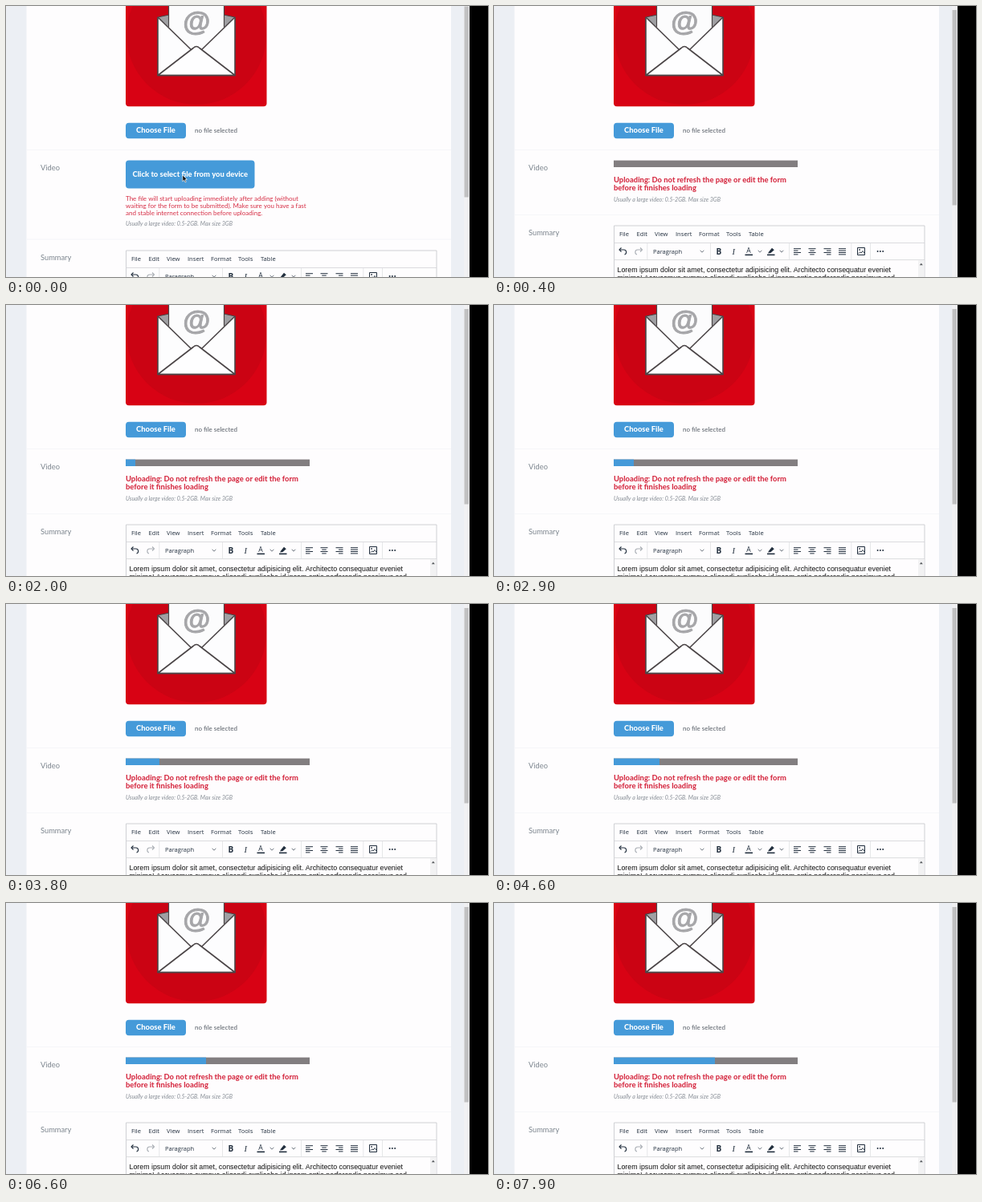
Recreate the animation shown at these times as an HTML page with a canvas. Size 600 px wide and 338 px high, loop 8000 ms.

```html
<!DOCTYPE html>
<html lang="en">
<head>
<meta charset="utf-8">
<title>Video upload form</title>
<style>
html, body { margin: 0; width: 100%; height: 100%; overflow: hidden; background: #000; }
canvas { display: block; width: 600px; height: 338px; }
</style>
</head>
<body>
<canvas id="stage"></canvas>
<script>
const W = 600, H = 338, LOOP = 8000, STEP = 100;
const UPLOAD_AT = 200;
const BLUE = '#459ad9', RED = '#d62e45', INK = '#222f3e', MUTED = '#7c858e';
const UI = 'Lato, sans-serif', MENU = '"Open Sans", sans-serif', BODY = '"Liberation Sans", Arial, sans-serif';
const STRONG = '800 9.4px ' + UI;
// Upload progress: [time in ms, filled pixels]
const PROGRESS = [[1000, 0], [2000, 12], [2900, 25], [4600, 57], [6600, 100], [7900, 126], [8000, 128]];

const canvas = document.getElementById('stage');
const c = canvas.getContext('2d');
const dpr = window.devicePixelRatio || 1;
canvas.width = W * dpr;
canvas.height = H * dpr;

function rect(x, y, w, h, fill) {
  c.fillStyle = fill;
  c.fillRect(x, y, w, h);
}

function round(x, y, w, h, r, fill) {
  c.fillStyle = fill;
  c.beginPath();
  c.roundRect(x, y, w, h, r);
  c.fill();
}

function text(s, x, y, font, fill) {
  c.font = font;
  c.fillStyle = fill;
  c.fillText(s, x, y);
}

function path(points, fill, stroke, width = 1) {
  c.beginPath();
  points.forEach(([x, y], i) => i ? c.lineTo(x, y) : c.moveTo(x, y));
  if (fill) {
    c.closePath();
    c.fillStyle = fill;
    c.fill();
  }
  if (stroke) {
    c.strokeStyle = stroke;
    c.lineWidth = width;
    c.stroke();
  }
}

function progress(t) {
  if (t <= PROGRESS[0][0]) return 0;
  const i = PROGRESS.findIndex(p => p[0] >= t);
  const [t0, w0] = PROGRESS[i - 1], [t1, w1] = PROGRESS[i];
  return w0 + (w1 - w0) * (t - t0) / (t1 - t0);
}

function page(uploading) {
  rect(0, 0, W, H, '#eceff4');
  rect(25.5, 0, 528.5, H, '#fefdfe');
  rect(570, 0, 7, H, '#f1f1f3');
  if (uploading) rect(570.5, 5, 5.5, 243.5, '#c1c1c2');
  else rect(570.5, 0.5, 5.5, 238, '#c1c1c2');
  rect(577, 0, 23, H, '#000');
  rect(26, 179, 528, 1, '#f6f6f9');
  rect(26, uploading ? 260 : 290.5, 528, 1, '#f6f6f9');
}

function picture() {
  c.save();
  c.beginPath();
  c.roundRect(149, -50, 175.5, 175.3, 4);
  c.clip();
  rect(149, -50, 176, 176, '#d80214');
  c.fillStyle = '#cb0313';
  c.beginPath();
  c.arc(237, 36, 87, 0, 7);
  c.fill();
  c.restore();

  const line = '#4b4547', thick = 1.6;
  c.lineJoin = 'round';
  path([[189, 14], [203, 11], [271, 11], [285, 14], [285, 40], [189, 40]], '#a0a0a3', line, 1.2);
  rect(202, -10, 70, 66, '#fcfcfd');
  path([[202.5, -10], [202.5, 28]], null, line, 1.2);
  path([[271.5, -10], [271.5, 28]], null, line, 1.2);
  c.textAlign = 'center';
  text('@', 237.3, 31.3, 'bold 35px ' + BODY, '#a6a6a9');
  c.strokeStyle = '#a6a6a9';
  c.lineWidth = 0.9;
  c.strokeText('@', 237.3, 31.3);
  c.textAlign = 'left';
  path([[189, 14], [232, 53], [242, 53], [285, 14], [285, 87], [189, 87]], '#fdfdfe');
  path([[189, 14], [230.5, 54.5]], null, line, thick);
  path([[285, 14], [243.5, 54.5]], null, line, thick);
  c.beginPath();
  c.moveTo(189, 86.5);
  c.lineTo(233, 52.5);
  c.quadraticCurveTo(237, 48.5, 241, 52.5);
  c.lineTo(285, 86.5);
  c.closePath();
  c.fillStyle = '#fefeff';
  c.fill();
  c.strokeStyle = line;
  c.lineWidth = thick;
  c.stroke();
  path([[189, 14], [189, 86.5], [285, 86.5], [285, 14]], null, line, thick);
}

function fileRow() {
  round(149, 145.8, 75, 19.5, 4, BLUE);
  text('Choose File', 162, 158.4, STRONG, '#fff');
  text('no file selected', 235, 158.3, '8px ' + UI, '#545b64');
}

function videoRow(uploading, t) {
  text('Video', 43, 205.3, '9.3px ' + UI, MUTED);
  if (uploading) {
    rect(149, 192.6, 229, 8.4, '#827e80');
    rect(149, 192.6, progress(t), 8.4, BLUE);
    text('Uploading: Do not refresh the page or edit the form', 149, 220.2, STRONG, RED);
    text('before it finishes loading', 149, 230.2, STRONG, RED);
  } else {
    round(149, 192.5, 160.5, 35, 4, BLUE);
    text('Click to select file from you device', 157.5, 213.2, STRONG, '#fff');
    ['The file will start uploading immediately after adding (without',
      'waiting for the form to be submitted). Make sure you have a fast',
      'and stable internet connection before uploading.'
    ].forEach((s, i) => text(s, 149, 243.4 + i * 8.9, '8px ' + UI, RED));
  }
  text('Usually a large video: 0.5-2GB. Max size 3GB', 149, uploading ? 243.6 : 274.4, 'italic 7.1px ' + UI, '#858c94');
}

function chevron(x) {
  path([[x - 2.3, 304.8], [x, 307.2], [x + 2.3, 304.8]], null, '#5d6671', 0.9);
}

function lines(x, widths, align) {
  widths.forEach((w, i) => rect(x + (9 - w) * align, 302.2 + i * 2.4, w, 1, INK));
}

function curl(x, dir, color) {
  path([[x - 2 * dir, 301.5], [x - 4.5 * dir, 304], [x - 2 * dir, 306.5]], null, color, 1.1);
  c.beginPath();
  c.moveTo(x - 4 * dir, 304);
  c.lineTo(x + dir, 304);
  c.bezierCurveTo(x + 5 * dir, 304, x + 5 * dir, 309.5, x + 2 * dir, 310);
  c.stroke();
}

function toolbar() {
  curl(160.5, 1, INK);
  curl(180, -1, '#a9aeb4');
  text('Paragraph', 198, 308.8, '7.5px ' + MENU, INK);
  [259, 331, 358].forEach(chevron);
  [190.5, 269, 367, 444.5, 468].forEach(x => rect(x, 296, 0.7, 20, '#dcdddf'));

  text('B', 276.6, 309.8, 'bold 10px ' + MENU, INK);
  text('I', 296.5, 309.8, 'italic 10.5px "Liberation Serif", serif', INK);
  text('A', 314.2, 308, '8.6px ' + MENU, INK);
  rect(312.5, 309.6, 9.5, 1.6, INK);
  path([[342, 306.8], [346, 301.8], [348.8, 304.2], [344.6, 308], [341, 308.4]], INK);
  rect(340, 309.6, 9.5, 1.6, INK);

  lines(373, [9, 5.5, 9, 5.5], 0);
  lines(391.5, [9, 5.5, 9, 5.5], 0.5);
  lines(410.5, [9, 5.5, 9, 5.5], 1);
  lines(429, [9, 9, 9, 9], 0);

  c.strokeStyle = INK;
  c.lineWidth = 1;
  c.strokeRect(452.5, 301.5, 9, 9);
  path([[453.5, 309], [455.7, 306.8], [457.2, 308], [459, 305.5], [461, 308]], null, INK, 0.9);
  rect(454.3, 303.2, 1.6, 1.6, INK);
  [477.6, 480.9, 484.2].forEach(x => round(x - 1, 305, 2, 2, 1, INK));
}

function summaryRow(uploading) {
  c.save();
  if (!uploading) c.translate(0, 31);
  text('Summary', 43, 286.3, '9.3px ' + UI, MUTED);
  c.strokeStyle = '#cfd0d3';
  c.lineWidth = 1;
  c.strokeRect(149.5, 274, 386.5, 120);
  rect(149, 295, 387, 0.8, '#d3d4d7');
  rect(149, 316.3, 387, 0.8, '#d3d4d7');
  const menu = { File: 156, Edit: 177.5, View: 200, Insert: 226, Format: 255, Tools: 289, Table: 317 };
  for (const name in menu) text(name, menu[name], 287.2, '7.6px ' + MENU, INK);
  toolbar();
  rect(528, 317, 7.5, 60, '#f2f2f3');
  path([[529.8, 323.2], [531.8, 320.8], [533.8, 323.2]], '#55585c');
  text('Lorem ipsum dolor sit amet, consectetur adipisicing elit. Architecto consequatur eveniet', 153.5, 332, '8.84px ' + BODY, '#111');
  text('minima! Accusamus cumque aligendi explicabo id ipsam optio perferendis possimus sed', 153.5, 341.5, '8.84px ' + BODY, '#111');
  c.restore();
}

function pointer(x, y) {
  const tip = [[0, 0], [0, 8], [1.9, 6.3], [3.2, 9.2], [4.5, 8.6], [3.2, 5.8], [5.6, 5.6]];
  path(tip.map(([a, b]) => [x + a, y + b]).concat([[x, y]]), '#111', '#fff', 0.7);
}

function draw(t) {
  const uploading = t >= UPLOAD_AT;
  c.setTransform(dpr, 0, 0, dpr, 0, 0);
  page(uploading);
  picture();
  fileRow();
  videoRow(uploading, t);
  summaryRow(uploading);
  if (!uploading) pointer(219.8, 210.8);
}

const start = performance.now();
function tick() {
  const t = (performance.now() - start) % LOOP;
  draw(Math.floor(t / STEP) * STEP);
  requestAnimationFrame(tick);
}
tick();
</script>
</body>
</html>
```
